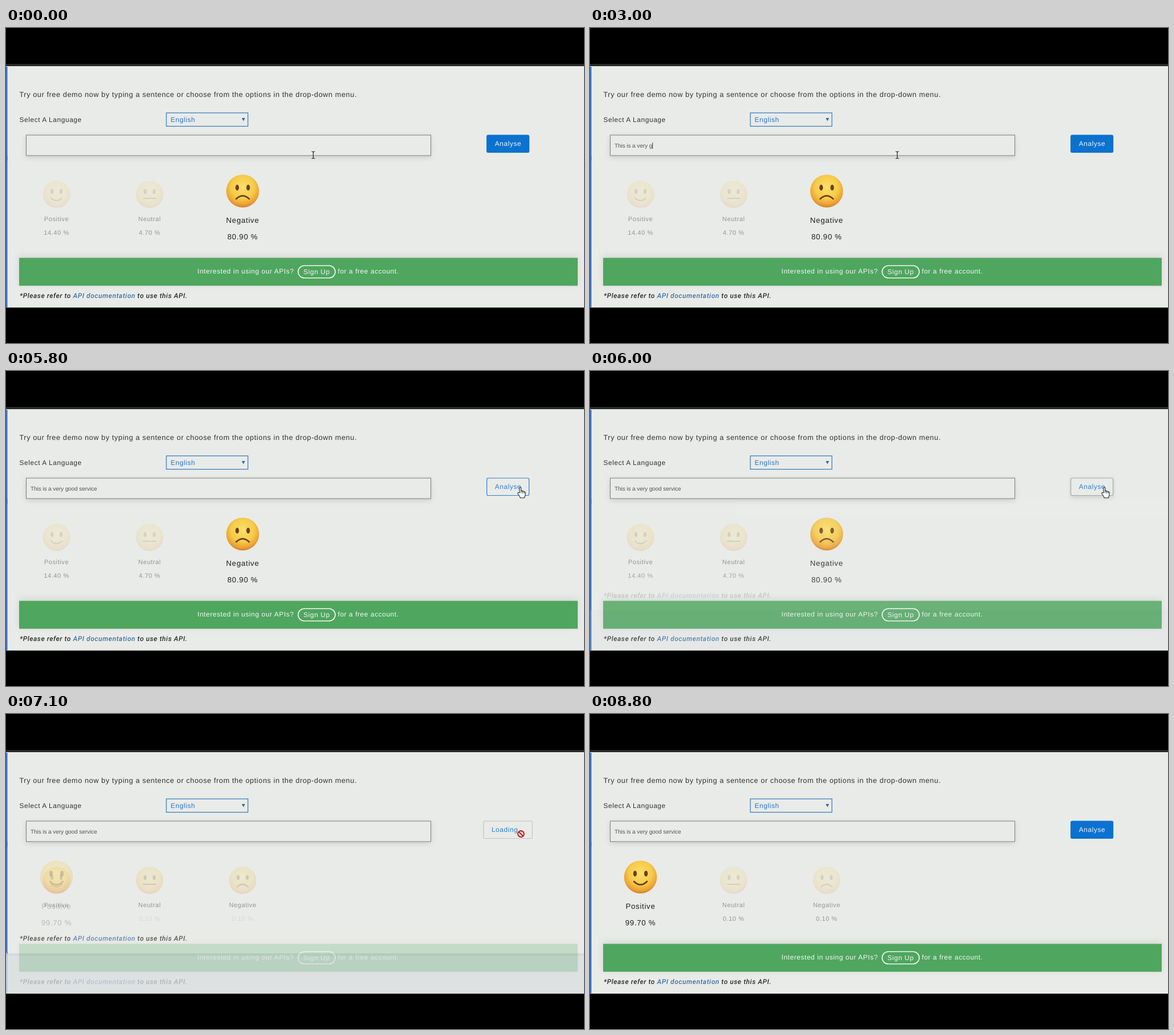
Animation, 1013 px wide and 553 px high, one loop 9.2 s. Source, as an HTML page:

```html
<!DOCTYPE html>
<html lang="en">
<head>
<meta charset="utf-8">
<title>Sentiment demo</title>
<style>
  html, body { margin: 0; width: 100%; height: 100%; overflow: hidden; background: #000; }
  svg { display: block; width: 1013px; height: 553px; }
  text {
    font: 11.88px "Liberation Sans", Arial, sans-serif;
    letter-spacing: .6px; white-space: pre; fill: #333;
    text-rendering: geometricPrecision;
  }
  .title { font-size: 12.67px; }
  .mid { text-anchor: middle; }
  .score { font-size: 11px; text-anchor: middle; fill: #949694; }
  .on .score { fill: #1f1f1f; }
  .face { opacity: .15; }
  .wait .face { opacity: .22; }
  .on .face { opacity: 1; }
  .note { font: italic 500 11.88px Roboto, sans-serif; fill: #2a2a2a; }
  .link { fill: #3b70a8; }
  .white text { fill: #f3f8f3; }
  #typed { font-size: 10px; letter-spacing: -.07px; fill: #555; }
</style>
</head>
<body>
<svg viewBox="0 0 1013 553">
  <defs>
    <radialGradient id="skin" cx=".5" cy=".38" r=".64">
      <stop offset="0" stop-color="#fbdf6a"/>
      <stop offset=".55" stop-color="#f6cb49"/>
      <stop offset=".85" stop-color="#eb9f32"/>
      <stop offset="1" stop-color="#c4722a"/>
    </radialGradient>
    <filter id="soft" x="-5%" y="-40%" width="110%" height="200%">
      <feDropShadow dx="0" dy="3" stdDeviation="4" flood-opacity=".13"/>
    </filter>
    <filter id="glow" x="-5%" y="-50%" width="110%" height="200%">
      <feDropShadow dx="0" dy="-3" stdDeviation="6" flood-opacity=".1"/>
    </filter>
    <clipPath id="view"><rect y="63" width="1013" height="427.5"/></clipPath>
  </defs>
  <rect width="1013" height="553"/>
  <g clip-path="url(#view)">
    <rect y="63" width="1013" height="5" fill="#272829"/>
    <rect y="67" width="1013" height="424" fill="#e9ebe8"/>
    <g id="panels"></g>
    <rect y="68" width="2.5" height="165" fill="#3f70b6"/>
    <text class="title" x="23.5" y="121">Try our free demo now by typing a sentence or choose from the options in the drop-down menu.</text>
    <text x="23.5" y="165">Select A Language</text>
    <rect x="281" y="149" width="143" height="23.5" fill="#e9ebe8" stroke="#3c80c0" stroke-width="1.3"/>
    <text x="288.5" y="165" style="fill:#2a76c4">English</text>
    <path d="M413.2 158h5.8l-2.9 5.5z" fill="#1f6cb8"/>
    <rect x="35.5" y="188" width="709" height="36" fill="#e9ebe8" stroke="#7b7d7c" filter="url(#soft)"/>
    <text id="typed" x="43" y="210"></text>
    <path id="caret" stroke="#333" stroke-width=".9"/>
    <rect id="button" y="188" height="30.5" rx="2.5" stroke-width="1.2"/>
    <text id="action" class="mid" x="880" y="207.3"></text>
    <g id="ibeam" fill="none" stroke="#222" stroke-width="1.2">
      <path d="M-3 -6H-1L0 -5L1 -6H3M0 -5V5M-3 6H-1L0 5L1 6H3"/>
    </g>
    <path id="arrow" d="M0 0V14.5L3.4 11.4L5.6 16.5L7.8 15.5L5.6 10.5H10z" fill="#fff" stroke="#222"/>
    <g id="hand" stroke="#222" stroke-width="1.1" stroke-linejoin="round">
      <path d="M-1.4 10V1.4A1.4 1.4 0 0 1 1.4 1.4V7C2.2 6 3.8 6.2 4.1 7.4C5 6.6 6.5 7 6.7 8.2C7.7 7.7 8.7 8.3 8.7 9.4V13C8.7 15.5 7.2 16 7.2 18.8H-.2C-.2 16.5 -3.2 14 -4.5 11C-5 9.5 -3.4 8.7 -2.4 9.6z" fill="#fff"/>
      <path d="M1.4 7V10.5M4.1 7.4V11M6.7 8.2V11" fill="none" stroke-width=".9"/>
    </g>
    <g id="denied" fill="none" stroke="#bd1b1b" stroke-width="2">
      <circle cx="1" cy="6.5" r="5.4"/><path d="M-2.8 2.7L4.8 10.3"/>
    </g>
  </g>
</svg>
<script>
const $ = id => document.getElementById(id);
const LOOP = 9200, SENTENCE = 'This is a very good service';
// one key press per letter, in tenths of a second
const KEYS = [1, 3, 5, 7, 8, 10, 12, 13, 15, 16, 20, 22, 24, 26, 28,
  30, 32, 33, 34, 35, 37, 39, 41, 42, 44, 46, 47];

const MOODS = [
  ['Positive', 88.5, 'M-9.5 6.5Q0 16 9.5 6.5'],
  ['Neutral', 251.7, 'M-11 7H11'],
  ['Negative', 414.8, 'M-9.5 11.5Q0 2.5 9.5 11.5']
];

const mood = ([name, x, mouth], score, on) => `
  <g class="${on ? 'on' : ''}" transform="translate(${x} 321) scale(${on ? 1.2 : 1})">
    <g class="face" transform="translate(0 -29)">
      <circle r="24" fill="url(#skin)"/>
      <ellipse cx="-8" cy="-5" rx="2.6" ry="4.3" fill="#6b3f16"/>
      <ellipse cx="8" cy="-5" rx="2.6" ry="4.3" fill="#6b3f16"/>
      <path d="${mouth}" fill="none" stroke="#6b3f16" stroke-width="2.2" stroke-linecap="round"/>
    </g>
    <text class="score" y="17.6">${name}</text>
    <text class="score" y="42">${score ? score + ' %' : ''}</text>
  </g>`;

const note = y => `
  <text class="note" x="24" y="${y}">*Please refer to <tspan class="link">API documentation</tspan> to use this API.</text>`;

const banner = `
  <rect x="23" y="403.5" width="979" height="49" fill="#50a65e" filter="url(#glow)"/>
  <g class="white">
    <text x="335.5" y="431.3">Interested in using our APIs?</text>
    <rect x="512" y="417.3" width="65" height="21.5" rx="10.7" fill="none" stroke="#f3f8f3" stroke-width="1.6"/>
    <text class="mid" x="544.5" y="432">Sign Up</text>
    <text x="581.5" y="431.3">for a free account.</text>
  </g>`;

const loadingCard = `
  <rect y="420" width="1013" height="71" fill="#d9dee0"/>
  <rect y="420" width="1013" height="5" fill="#d2d6d8"/>
  <path d="M0 225H2.5V418Q2.5 420 4 420.5Q0 421 0 417z" fill="#3f70b6"/>`;

const panel = (scores, best) => `
  <g class="${scores ? '' : 'wait'}">
    <rect y="225" width="1013" height="266" fill="#e9ebe8"/>
    ${scores ? '<rect y="225" width="2.5" height="266" fill="#3f70b6"/>' + banner : loadingCard}
    ${MOODS.map((m, i) => mood(m, scores && scores[i], i === best)).join('')}
    ${note(scores ? 473.7 : 397.7)}
  </g>`;

$('panels').innerHTML =
  panel(['14.40', '4.70', '80.90'], 2) + panel(null, -1) + panel(['99.70', '0.10', '0.10'], 0);
const [, loading, result] = $('panels').children;

const ramp = (t, from, to) => Math.min(1, Math.max(0, (t - from) / (to - from)));
const mix = (a, b, k) => a + (b - a) * k;

function setButton(label, width, fill, stroke, ink) {
  const b = $('button');
  b.setAttribute('x', 879.7 - width / 2);
  b.setAttribute('width', width);
  b.setAttribute('fill', fill);
  b.setAttribute('stroke', stroke);
  b.setAttribute('filter', stroke === '#a3a8aa' ? 'url(#soft)' : 'none');
  $('action').textContent = label;
  $('action').style.fill = ink;
}

function pointer(t) {
  const go = ramp(t, 5000, 5700), ease = go * go * (3 - 2 * go), leave = ramp(t, 8400, 8700);
  return [
    mix(mix(538.5, 901.5, ease), 939, leave),
    mix(mix(223, 204, ease), 102, leave)
  ];
}

function draw(t) {
  loading.style.opacity = ramp(t, 5940, 6280);
  result.style.opacity = ramp(t, 7000, 7420);

  const count = KEYS.filter(k => k * 100 <= t).length;
  $('typed').textContent = SENTENCE.slice(0, count);
  const end = 43.5 + (count ? $('typed').getComputedTextLength() : 0);
  $('caret').setAttribute('d', count && t < 5100 ? `M${end} 201V212` : '');

  const [x, y] = pointer(t);
  const hover = x > 842 && x < 917 && y > 188 && y < 219;
  const busy = t >= 6100 && t < 7200;
  const light = '#e9ebe8', blue = '#2f7fc9';
  if (busy) setButton('Loading...', 85.5, light, '#bfc4c6', blue);
  else if (!hover) setButton('Analyse', 74, '#0b72d0', '#0b72d0', '#eef5fb');
  else setButton('Analyse', 74, light, t >= 5900 && t < 6100 ? '#a3a8aa' : blue, blue);

  const shape = t >= 8800 ? '' : t >= 6500 && t < 7200 ? 'denied'
    : hover ? 'hand' : x < 745 ? 'ibeam' : 'arrow';
  for (const id of ['ibeam', 'arrow', 'hand', 'denied']) {
    $(id).style.display = id === shape ? '' : 'none';
    $(id).setAttribute('transform', `translate(${x} ${y})`);
  }
}

const start = performance.now();
function tick() {
  const t = (performance.now() - start) % LOOP;
  draw(Math.floor(t / 100) * 100);
  requestAnimationFrame(tick);
}
tick();
</script>
</body>
</html>
```
